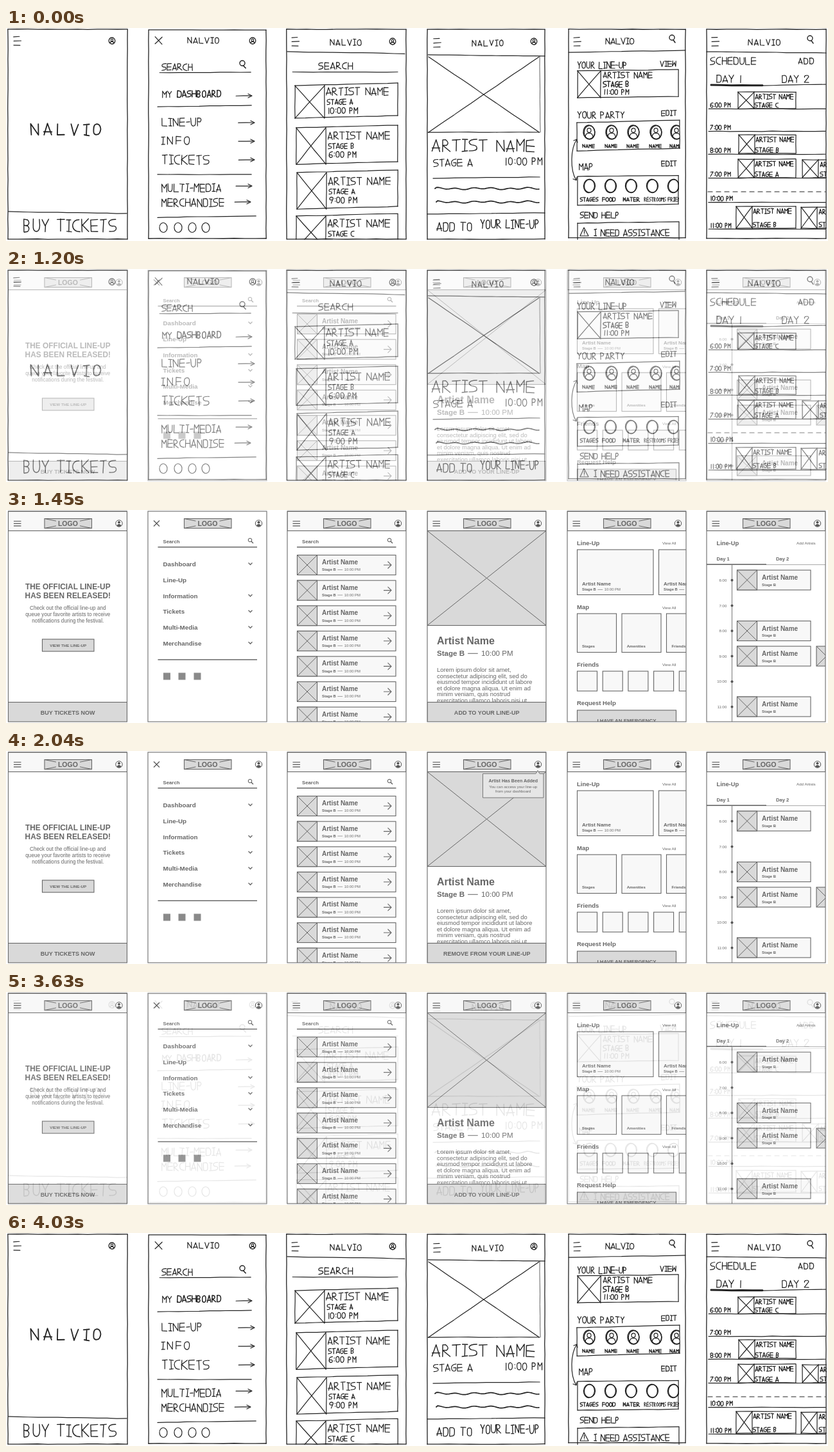
Recreate the animation shown at these times as an HTML page. Size 1280x333 px, loop 4.08 s.

```html
<!DOCTYPE html>
<html lang="en">
<head>
<meta charset="utf-8">
<title>Sketch to wireframe</title>
<style>
html, body { margin: 0; width: 100%; height: 100%; overflow: hidden; background: #fff; }
#stage { display: block; width: 100vw; height: 100vh; }
#stage text { font-family: "Liberation Sans", Arial, sans-serif; fill: #666; }
#sketch { fill: none; stroke: #222; stroke-linecap: round; stroke-linejoin: round; }
</style>
</head>
<body>
<svg id="stage" viewBox="0 0 1280 333" preserveAspectRatio="none">
  <rect width="1280" height="333" fill="#fff"/>
  <g id="sketch"></g>
  <g id="wire" opacity="0"></g>
</svg>
<script>
const BRAND = 'NALVIO';
const $ = id => document.getElementById(id);
const clip = (x, w, body) =>
  `<svg x="${x}" y="0" width="${w}" height="331" viewBox="${x} 0 ${w} 331">${body}</svg>`;

// ---------- hand-drawn layer ----------
let seed = 11;
const rnd = () => (seed = (seed * 16807) % 2147483647) / 2147483647 - 0.5;
const f = n => n.toFixed(2);
const stroke = (d, w = 1.2) => `<path d="${d}" stroke-width="${w}"/>`;

// Letter strokes on a 3 x 5 grid (a..o, row by row); a capital is a curve control.
const GLYPHS = {
  A: 'mbo jl', B: 'am abFhg hLnm', C: 'cAgMo', D: 'am abCiOnm', E: 'camo gi', F: 'cam gi',
  G: 'cAgMnOih', H: 'am co gi', I: 'bn ac mo', K: 'am cg go', L: 'amo', M: 'mahco', N: 'maoc',
  O: 'bAgMnOiCb', P: 'mabFhg', R: 'mabFhgo', S: 'cAdGhIlOm', T: 'ac bn', U: 'agMnOic',
  V: 'anc', W: 'ameoc', Y: 'ahc hn', '0': 'bAgMnOiCb', '1': 'bn', '2': 'dAbCfmo',
  '6': 'cAgMnOlIhGj', '7': 'acm', '8': 'bAdGhIfCb hGjMnOlIh', '9': 'fIhGdAbCfn',
  ':': 'ee kk', '-': 'gi'
};
const SPAN = { I: .7, ' ': .7, '-': .7, ':': .5, '1': .6 };

function pen(str, x, base, h, adv, w = 1.2) {
  let d = '';
  for (const ch of str) {
    const span = SPAN[ch] || 1, gw = Math.min(adv * .74, h * .66) * span;
    const dy = rnd() * h * .08;
    for (const part of (GLYPHS[ch] || '').split(' ')) {
      let ctrl = false;
      [...part].forEach((p, i) => {
        const n = p.toLowerCase().charCodeAt(0) - 97;
        const px = x + (n % 3) / 2 * gw + rnd() * h * .08;
        const py = base + dy - h + Math.floor(n / 3) / 4 * h + rnd() * h * .08;
        const isCtrl = p < 'a';
        d += (i === 0 ? 'M' : isCtrl ? 'Q' : ctrl ? ' ' : 'L') + f(px) + ' ' + f(py);
        ctrl = isCtrl;
      });
    }
    x += adv * span;
  }
  return stroke(d, w);
}

function ln(x1, y1, x2, y2, w) {
  const n = Math.max(1, Math.round(Math.hypot(x2 - x1, y2 - y1) / 16));
  let d = '';
  for (let i = 0; i <= n; i++) {
    const k = i / n;
    d += (i ? 'L' : 'M') + f(x1 + (x2 - x1) * k + rnd() * .5) + ' ' + f(y1 + (y2 - y1) * k + rnd() * .6);
  }
  return stroke(d, w);
}
// tilt raises the right-hand side
const box = (x1, y1, x2, y2, tilt = 0, w) =>
  ln(x1, y1, x2, y1 - tilt, w) + ln(x2, y1 - tilt, x2, y2 - tilt, w) + ln(x2, y2 - tilt, x1, y2, w) + ln(x1, y2, x1, y1, w);
const cross = (x1, y1, x2, y2) => ln(x1, y1, x2, y2) + ln(x2, y1, x1, y2);
const card = (x1, y1, x2, y2, size, tilt) =>
  box(x1, y1, x2, y2, tilt) + ln(x1 + size, y1, x1 + size, y2) + cross(x1, y1, x1 + size, y2);
const oval = (x, y, rx, ry, w = 1.2) =>
  `<ellipse cx="${x}" cy="${y}" rx="${rx}" ry="${ry}" stroke-width="${w}" transform="rotate(${f(rnd() * 14)} ${x} ${y})"/>`;
const lens = (x, y) => oval(x, y, 4, 4, 1.4) + ln(x + 2, y + 4, x + 5, y + 8, 1.6);
const face = (x, y) => oval(x, y, 4.8, 5, 1.3) + oval(x, y - 1, 1.7, 1.9) +
  stroke(`M${x - 3} ${y + 3}Q${x} ${y - 1} ${x + 3} ${y + 3}`, 1.3);
const burger = (x, y) => ln(x, y, x + 9, y - .5) + ln(x, y + 6.5, x + 11.5, y + 6) + ln(x, y + 13, x + 10, y + 13);
const arrow = (x, y) => ln(x, y, x + 24, y) + stroke(`M${x + 19} ${y - 3}L${x + 25} ${y}L${x + 19} ${y + 3}`);

function wave(x1, x2, y) {
  let d = `M${x1} ${y}`;
  for (let x = x1 + 2; x <= x2; x += 2) d += `L${x} ${f(y + 1.1 * Math.sin(x / 4.5) + .7 * Math.sin(x / 11))}`;
  return stroke(d, 1.7);
}
const bigCard = (x, y1, y2, ty, stage, time) =>
  card(x, y1, 610, y2, 46, 4) + pen('ARTIST NAME', x + 49, ty, 11.5, 9.5) +
  pen('STAGE ' + stage, x + 50, ty + 14.5, 8, 6.2) + pen(time, x + 51, ty + 28.5, 9, 7.1);
const slot = (x, y1, y2, stage) =>
  card(x, y1, 1230, y2, 25) + pen('ARTIST NAME', x + 27, y1 + 11, 7.5, 5.8) +
  pen('STAGE ' + stage, x + 26, y2 - 2, 7, 5.7);
const cutSlot = (x, y1, y2) =>
  card(x, y1, 1290, y2, 25) + pen('AR', x + 28, y1 + 11, 7.5, 5.8) + pen('ST', x + 28, y2 - 2, 7, 5.7);
const avatar = x => oval(x, 163, 9, 11, 1.5) + oval(x + .5, 163, 8.2, 10.4) + oval(x, 160, 3, 3.4) +
  stroke(`M${x - 6} 170Q${x - 5} 164 ${x} 164.5Q${x + 5} 164 ${x + 6} 170`) + pen('NAME', x - 10, 187, 5, 5);
const ring = x => oval(x, 247, 8.5, 10.5, 1.4) + oval(x + 1, 247, 8.5, 10);

const sketch = [
  [3, 2, 186, 328,
    burger(12, 14) + face(165, 20) + pen(BRAND, 39, 167, 17, 20.6, 1.8) +
    ln(4, 287, 188, 290) + pen('BUY TICKETS', 28, 318, 19, 14.1, 1.4)],
  [222, 3, 183, 326,
    cross(232, 14, 243, 25) + pen(BRAND, 283, 24, 9, 9) + face(384, 20) +
    pen('SEARCH', 243, 66, 10, 8.2) + lens(368, 55) + ln(239, 70, 381, 69) +
    pen('MY ', 244, 109, 10, 7.9) + pen('DASHBOARD', 267, 108, 10, 7.7, 1.5) + arrow(358, 106) + ln(236, 123, 382, 121) +
    pen('LINE-UP', 243, 153, 12, 10.2) + arrow(362, 148) +
    pen('INFO', 242, 182, 12, 13.3) + arrow(362, 177) +
    pen('TICKETS', 243, 213, 14, 11.3) + arrow(362, 206) + ln(236, 229, 382, 229) +
    pen('MULTI-MEDIA', 243, 256, 12, 9.3) + arrow(358, 247) +
    pen('MERCHANDISE', 243, 279, 12, 9.2) + arrow(356, 272) + ln(236, 296, 389, 294) +
    [245, 268, 290, 311].map(x => oval(x, 312, 6, 7.5)).join('')],
  [437, 2, 186, 328,
    burger(445, 15) + pen(BRAND, 505, 27, 9, 9) + face(602, 21) + ln(438, 37, 621, 40) +
    pen('SEARCH', 487, 64, 10, 9.2) + ln(446, 69, 610, 69) +
    bigCard(450, 90, 141, 105, 'A', '10:00 PM') + bigCard(452, 156, 213, 174, 'B', '6:00 PM') +
    bigCard(453, 226, 283, 245, 'A', '9:00 PM') + bigCard(452, 294, 345, 311, 'C', '')],
  [656, 2, 183, 328,
    burger(666, 17) + pen(BRAND, 726, 28, 9, 9) + face(822, 21) + ln(657, 42, 839, 44) +
    cross(658, 45, 830, 163) + ln(657, 163, 831, 163) + ln(831, 44, 832, 163, .7) +
    pen('ARTIST NAME', 664, 193, 18, 15.6, 1.4) + pen('STAGE A', 666, 216, 11, 9.3) +
    pen('10:00 PM', 777, 214, 11, 8.8) + ln(665, 235, 831, 233) +
    wave(668, 830, 251) + wave(670, 830, 272) + ln(656, 291, 839, 289) +
    pen('ADD TO', 671, 317, 13, 10, 1.3) + pen('YOUR LINE-UP', 739, 313, 13, 8.4, 1.3)],
  [876, 2, 182, 326,
    burger(884, 15) + pen(BRAND, 934, 25, 9, 8) + lens(1037, 15) + ln(876, 38, 1058, 35) +
    pen('YOUR LINE-UP', 890, 63, 10, 7.1) + pen('VIEW', 1019, 60, 8, 7) +
    card(890, 67, 1047, 109, 36, 2) + pen('ARTIST NAME', 930, 78, 9, 7.5) +
    pen('STAGE B', 930, 92, 8.5, 6.2, 1.4) + pen('11:00 PM', 931, 104, 8, 6.3) +
    pen('YOUR PARTY', 890, 141, 10, 7.7) + pen('EDIT', 1021, 137, 8, 6.7) + box(889, 148, 1049, 192, 4) +
    clip(886, 163, [908, 943, 977, 1012, 1044].map(avatar).join('')) +
    stroke('M889 174C879 188 878 222 888 238M884 176L889 174L890 179M883 236L888 238L889 233') +
    pen('MAP', 893, 222, 10, 7.7) + pen('EDIT', 1021, 216, 8, 6.7) + box(890, 232, 1047, 277, 1.5) +
    clip(886, 162, [908, 941, 973, 1006, 1039].map(ring).join('') +
      pen('STAGES', 894, 271, 6, 4.9) + pen('FOOD', 929, 271, 6, 5.3) + pen('WATER', 961, 271, 6, 5.4) +
      pen('RESTROOMS', 994, 271, 6, 3.8, 1) + pen('FRIENDS', 1031, 271, 6, 4.2, 1)) +
    pen('SEND HELP', 894, 297, 9, 7.2) + box(890, 305, 1048, 345, 2) +
    stroke('M894 325L900 312L907 325ZM900.5 316V321M900.5 323V323') + pen('I NEED ASSISTANCE', 916, 325, 10, 7.5)],
  [1091, 2, 186, 327,
    burger(1099, 15) + pen(BRAND, 1156, 27, 9, 9.2) + lens(1252, 16) + ln(1091, 37, 1277, 39) +
    pen('SCHEDULE', 1097, 57, 11, 9.1) + pen('ADD', 1234, 56, 9, 8.7) +
    pen('DAY 1', 1107, 85, 11, 9.5) + pen('DAY 2', 1209, 85, 11, 9.2) +
    ln(1098, 89, 1178, 90, 3) + ln(1178, 90, 1276, 88) +
    [['6:00 PM', 124], ['7:00 PM', 159], ['8:00 PM', 195], ['7:00 PM', 232], ['10:00 PM', 270], ['11:00 PM', 312]]
      .map(([s, y]) => pen(s, 1097, y, 7, 5.2) + ln(1094, y + 2.5, 1276, y + 2.5)).join('') +
    slot(1140, 100, 126, 'C') + slot(1141, 167, 196, 'B') + slot(1140, 205, 234, 'A') + slot(1137, 279, 313, 'B') +
    cutSlot(1240, 206, 234) + cutSlot(1238, 280, 313) +
    '<path d="M1093 256H1276" stroke-width="1.2" stroke-dasharray="7 6"/>']
];
$('sketch').innerHTML = sketch.map(([x, y, w, h, body]) =>
  clip(x - 1, w + 2, body) + box(x, y, x + w, y + h, 0, 1.3)).join('');

// ---------- wireframe layer ----------
const INK = '#666', PALE = '#f8f8f8', MID = '#d9d9d9';
const txt = (s, x, y, size, bold = 1, anchor = 'start') =>
  `<text x="${x}" y="${y}" font-size="${size}" font-weight="${bold ? 700 : 400}" text-anchor="${anchor}">${s}</text>`;
const mid = (s, x, y, size, bold) => txt(s, x, y, size, bold, 'middle');
const rect = (x, y, w, h, fill = PALE, line = INK) =>
  `<rect x="${x}" y="${y}" width="${w}" height="${h}" fill="${fill}" stroke="${line}" stroke-width="1.1"/>`;
const path = (d, w = 1.1, color = INK) => `<path d="${d}" fill="none" stroke="${color}" stroke-width="${w}"/>`;
const photo = (x, y, w, h) => rect(x, y, w, h, MID) + path(`M${x} ${y}l${w} ${h}m0 ${-h}l${-w} ${h}`, 1);
const search = (x, y) => `<circle cx="${x}" cy="${y}" r="2.8" fill="none" stroke="#555"/>` + path(`M${x + 2} ${y + 2}l3 3`, 1.2, '#555');
const stage = (x, y, s) => txt('Stage B', x, y, s) + path(`M${x + s * 4.15} ${y - s * .32}h${s * 1.35}`, s / 13 + .15) +
  txt('10:00 PM', x + s * 5.95, y, s, 0);
const bar = (x, s) => rect(x, 300.5, 185, 31, MID) + mid(s, x + 92.7, 320, 9.05);

function header(x, plain) {
  const cx = x + 172.5, lx = x + 56.5;
  return (plain ? '' : rect(x, 2, 185, 30.5)) +
    path(plain ? `M${x + 9} 16.5l9 9m0 -9l-9 9` : `M${x + 8.5} 17.5h11.5m0 3.7h-11.5m0 3.7h11.5`, 1.2, '#555') +
    photo(lx, 13.5, 73.5, 15) + `<rect x="${lx + 18}" y="14.5" width="37" height="13" fill="${MID}"/>` +
    mid('LOGO', x + 93, 25, 10.6) +
    `<circle cx="${cx}" cy="21" r="5.2" fill="#fff" stroke="#555"/><circle cx="${cx}" cy="19.3" r="2" fill="#555"/>` +
    `<path d="M${cx - 3.8} 24.3q3.8 -5 7.6 0q-3.8 3.2 -7.6 0z" fill="#555"/>`;
}
const finder = (x, mx) => txt('Search', x + 8, 51.5, 7.8) + search(mx, 47) + path(`M${x} 58h154.5`, 1.3);
const listCard = y => rect(453.5, y, 153.5, 31) + photo(453.5, y, 31, 31) + txt('Artist Name', 492, y + 14.5, 10) +
  stage(492, y + 24.8, 5.85) + path(`M588 ${y + 15.5}h12m-5.5 -5.5l5.5 5.5l-5.5 5.5`);
const dayCard = y => rect(1138.5, y, 114.5, 31) + photo(1138.5, y, 31, 31) +
  txt('Artist Name', 1177, y + 15, 10) + txt('Stage B', 1177, y + 24.5, 5.9);
const head = (s, y) => txt(s, 889, y, 9.5);
const view = y => txt('View All', 1022, y - .5, 6.1, 0);

const menu = ['Dashboard', 'Line-Up', 'Information', 'Tickets', 'Multi-Media', 'Merchandise'];
const lorem = ['Lorem ipsum dolor sit amet,', 'consectetur adipiscing elit, sed do', 'eiusmod tempor incididunt ut labore',
  'et dolore magna aliqua. Ut enim ad', 'minim veniam, quis nostrud', 'exercitation ullamco laboris nisi ut'];

const popup = bar(656, 'REMOVE FROM YOUR LINE-UP') +
  '<path d="M742.5 35.5H825L828 30.5L831 35.5H837V73H742.5Z" fill="#e6e6e6" stroke="#777"/>' +
  mid('Artist Has Been Added', 789.7, 48.5, 7.1) +
  mid('You can access your line-up', 789.7, 57.7, 6, 0) + mid('from your dashboard', 789.7, 65.2, 6, 0);

const wire = [
  [3.5, header(3.5) +
    mid('THE OFFICIAL LINE-UP', 96.3, 124.3, 11.9) + mid('HAS BEEN RELEASED!', 96.3, 138, 11.9) +
    mid('Check out the official line-up and', 96.3, 156, 8.2, 0) +
    mid('queue your favorite artists to receive', 96.3, 166, 8.2, 0) +
    mid('notifications during the festival.', 96.3, 176, 8.2, 0) +
    rect(56.5, 202, 80.5, 19, MID) + mid('VIEW THE LINE-UP', 96.7, 213.8, 6.25) + bar(3.5, 'BUY TICKETS NOW')],
  [221, header(221, true) + finder(236.5, 380) +
    menu.map((s, i) => {
      const y = 84.5 + i * 24.75;
      return txt(s, 244.5, y + 3.5, 9.8) + (s === 'Line-Up' ? '' : path(`M377.5 ${y - 2}l3 3l3 -3`, 1.3));
    }).join('') + path('M236.5 234H391', 1.3) +
    [250.5, 274, 298].map(x => `<rect x="${x - 5.5}" y="254.5" width="11" height="11" fill="#8a8a8a"/>`).join('')],
  [438, header(438) + finder(453, 597) +
    Array.from({ length: 7 }, (_, i) => listCard(70.5 + i * 39.6)).join('')],
  [656, header(656) + photo(656, 32.5, 185, 148) +
    txt('Artist Name', 671, 209.7, 16) + stage(671, 228, 11.6) +
    lorem.map((s, i) => txt(s, 671, 253 + i * 9.6, 9.4, 0)).join('') +
    bar(656, 'ADD TO YOUR LINE-UP') + `<g id="added" opacity="0">${popup}</g>`],
  [874, header(874) +
    head('Line-Up', 54.5) + view(54.5) +
    [889.5, 1016.5].map(x => rect(x, 62, 118.5, 70.5) + txt('Artist Name', x + 7.5, 118, 8) + stage(x + 7.5, 126.3, 5.85)).join('') +
    head('Map', 155) + view(155) +
    ['Stages', 'Amenities', 'Friends'].map((s, i) => rect(889.5 + i * 69.5, 162, 61, 60.5) + txt(s, 897 + i * 69.7, 215, 6.1)).join('') +
    head('Friends', 244.7) + view(244.7) +
    [0, 1, 2, 3, 4].map(i => rect(889.5 + i * 39.7, 252, 31, 31)).join('') +
    head('Request Help', 305) + rect(889.5, 313, 154, 31, MID) + mid('I HAVE AN EMERGENCY', 966.5, 331.7, 7.9)],
  [1091, header(1091) +
    txt('Line-Up', 1106.5, 54.5, 9.3) + txt('Add Artists', 1231, 54, 6.2, 0) +
    txt('Day 1', 1106.5, 79, 7.6) + txt('Day 2', 1199, 79, 7.6) +
    path('M1091 85.5H1276', 1, '#aaa') + path('M1091 85H1184', 1.5) + path('M1130.5 86V331', 1, '#777') +
    [6, 7, 8, 9, 10, 11].map((h, i) => {
      const y = 109.8 + i * 39.6;
      return txt(h + ':00', 1122.3, y + 2.1, 6, 0, 'end') + `<circle cx="1130.5" cy="${y}" r="2" fill="#555"/>`;
    }).join('') +
    [94, 173.5, 213, 292].map(dayCard).join('') + photo(1262, 213, 31, 31)]
];
$('wire').innerHTML = '<rect width="1280" height="333" fill="#fff"/>' + wire.map(([x, body]) =>
  clip(x, 185, body) + rect(x, 2, 185, 329, 'none', '#6c6c6c')).join('');

// ---------- timing ----------
const LOOP = 4080;
const ramp = (t, start, gap, n) => Math.min(n, Math.max(0, Math.floor((t - start) / gap) + 1)) / n;
const began = performance.now();
const layer = $('wire'), added = $('added');

function draw() {
  const t = Math.max(0, performance.now() - began) % LOOP;
  layer.setAttribute('opacity', ramp(t, 1050, 50, 9) - ramp(t, 3630, 50, 9));
  added.setAttribute('opacity', ramp(t, 1950, 30, 4) - ramp(t, 3040, 30, 4));
  requestAnimationFrame(draw);
}
draw();
</script>
</body>
</html>
```
